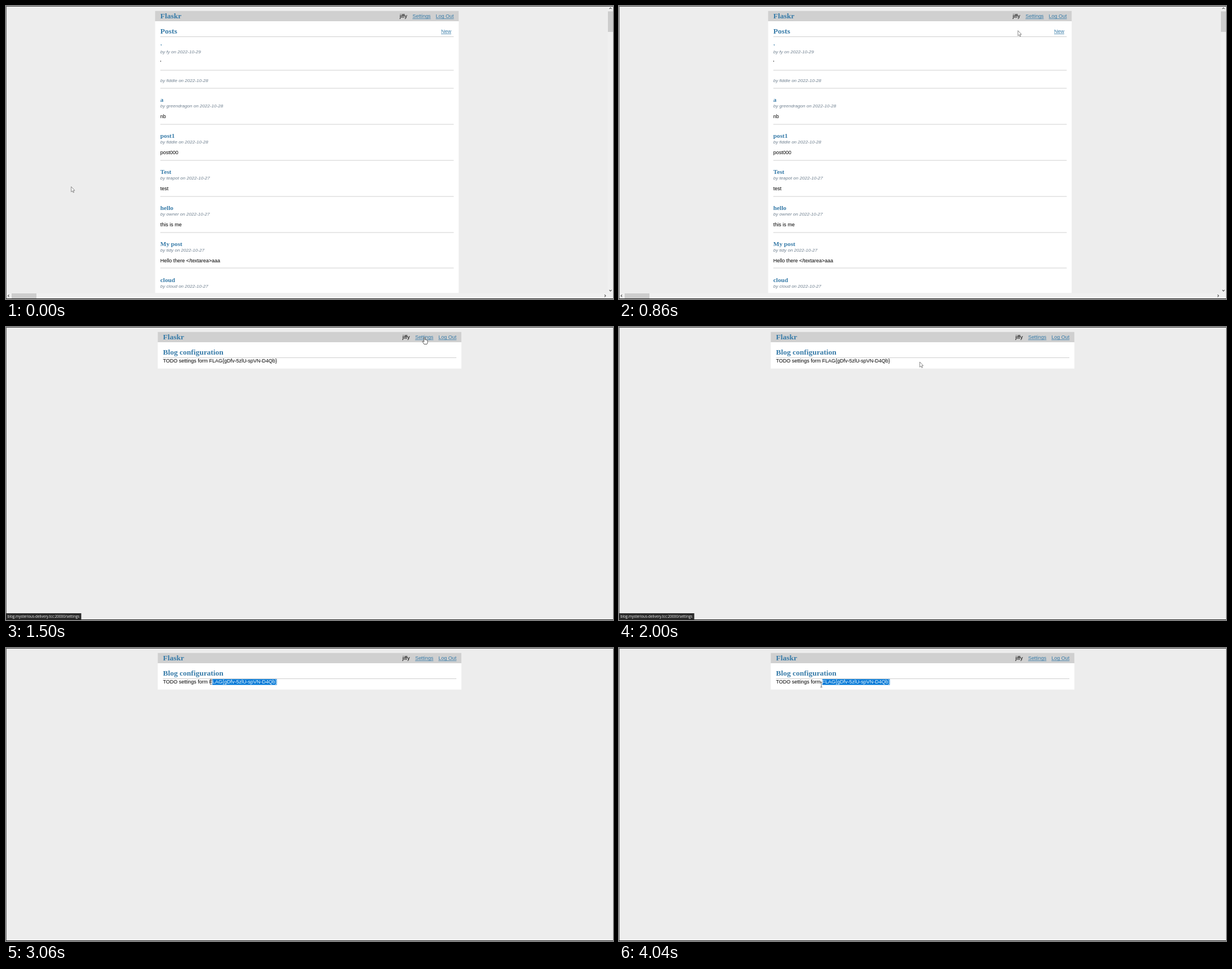
An HTML page with a canvas that plays this animation: 1077x520 px, repeating every 5420 ms.

```html
<!DOCTYPE html>
<html lang="en">
<head>
<meta charset="utf-8">
<title>Flaskr</title>
<style>
  html, body { margin: 0; width: 100%; height: 100%; overflow: hidden; background: #ededed; }
  canvas { display: block; }
</style>
</head>
<body>
<canvas id="stage" width="1077" height="520"></canvas>
<script>
const ctx = document.getElementById('stage').getContext('2d');
const W = 1077, H = 520, LOOP = 5420;
const PAGE_SWITCH = 1500, STATUS_ON = 1080, STATUS_OFF = 2100, SELECT_START = 2330, SELECT_LAG = 40;

const BLUE = '#377ba8', RULE = '#cfcfcf';
const SANS = '"Liberation Sans", Arial, sans-serif';
const SERIF = '"Liberation Serif", "Times New Roman", serif';
const BODY = '8.975px ' + SANS;
const ABOUT = 'italic 8.08px ' + SANS;
const HEADING = 'bold 13.46px ' + SERIF;
const TITLE = 'bold 11.22px ' + SERIF;
const STATUS = '6.36px "Open Sans", "Noto Sans", sans-serif';

const POSTS = [
  ["'", 'by fy on 2022-10-29', "'"],
  ['', 'by fiddle on 2022-10-28', ''],
  ['a', 'by greendragon on 2022-10-28', 'nb'],
  ['post1', 'by fiddle on 2022-10-28', 'post000'],
  ['Test', 'by teapot on 2022-10-27', 'test'],
  ['hello', 'by owner on 2022-10-27', 'this is me'],
  ['My post', 'by tidy on 2022-10-27', 'Hello there </textarea>aaa'],
  ['cloud', 'by cloud on 2022-10-27', '']
];
const SETTINGS_TEXT = 'TODO settings form FLAG{gDfv-5zlU-spVN-D4Qb}';
const FLAG_INDEX = SETTINGS_TEXT.indexOf('FLAG');

// Pointer path: time, x, y
const PATH = [
  [0, 115, 321], [500, 483, 174], [1000, 741, 21], [1160, 742.5, 18.5],
  [1780, 742.5, 18.5], [2000, 534, 62], [2260, 483, 60], [2340, 482, 60],
  [2720, 383, 60], [3060, 363.5, 60], [3500, 360, 62], [4040, 359, 65]
];

function slope(i, axis) {
  return (PATH[i + 1][axis] - PATH[i][axis]) / (PATH[i + 1][0] - PATH[i][0]);
}

// Monotone tangent, so that rests stay still and nothing overshoots
function tangent(i, axis) {
  if (i === 0) return slope(0, axis);
  if (i === PATH.length - 1) return 0;
  const a = slope(i - 1, axis), b = slope(i, axis);
  return a * b <= 0 ? 0 : 2 * a * b / (a + b);
}

function pointer(t) {
  const last = PATH.length - 1;
  if (t >= PATH[last][0]) return { x: PATH[last][1], y: PATH[last][2] };
  let i = 0;
  while (t >= PATH[i + 1][0]) i++;
  const span = PATH[i + 1][0] - PATH[i][0];
  const u = (t - PATH[i][0]) / span, v = 1 - u;
  const along = axis =>
    PATH[i][axis] * (1 + 2 * u) * v * v + PATH[i + 1][axis] * u * u * (3 - 2 * u) +
    span * u * v * (tangent(i, axis) * v - tangent(i + 1, axis) * u);
  return { x: along(1), y: along(2) };
}

function rect(x, y, w, h, color) {
  ctx.fillStyle = color;
  ctx.fillRect(x, y, w, h);
}

function text(str, x, y, font, color) {
  ctx.font = font;
  ctx.fillStyle = color;
  ctx.fillText(str, x, y);
}

function link(str, x, y) {
  text(str, x, y, BODY, BLUE);
  rect(x, y + 1.1, ctx.measureText(str).width, 0.8, BLUE);
}

function polyline(points, x, y, close) {
  ctx.beginPath();
  points.forEach(([px, py]) => ctx.lineTo(x + px, y + py));
  if (close) ctx.closePath();
}

function stroke(color, width) {
  ctx.strokeStyle = color;
  ctx.lineWidth = width;
  ctx.stroke();
}

function pageFrame(left, bottom, heading) {
  const inner = left + 9.2;
  rect(left, 8.8, 538.6, 18.2, '#d0d0d0');
  rect(left, 27, 538.6, bottom - 27, '#fff');
  text('Flaskr', inner, 22.4, HEADING, BLUE);
  text('jiffy', left + 433.9, 21.2, BODY, '#000');
  link('Settings', left + 456.6, 21.2);
  link('Log Out', left + 498, 21.2);
  text(heading, inner, 48.8, HEADING, BLUE);
  rect(inner, 54, 520.6, 1, RULE);
}

function scrollbars() {
  rect(1067.5, 1, 9.5, 518, '#f0f0f0');
  rect(1, 509.5, 1076, 9.5, '#f0f0f0');
  rect(1068, 9.5, 9, 36.5, '#cdcdcd');
  rect(10, 510, 44, 9, '#cdcdcd');
  const arrow = (x, y, dx, dy) => {
    polyline([[-dx - 2 * dy, -dy - 2 * dx], [dx, dy], [-dx + 2 * dy, -dy + 2 * dx]], x, y);
    stroke('#505050', 1.1);
  };
  arrow(1072.5, 4.2, 0, -1);
  arrow(1072.5, 505, 0, 1);
  arrow(4.5, 514.3, -1, 0);
  arrow(1063, 514.3, 1, 0);
}

function postsPage() {
  const left = 264.6, x = left + 9.2;
  pageFrame(left, 509.5, 'Posts');
  link('New', left + 507.4, 48);
  let y = 50.1;
  for (const [title, about, body] of POSTS) {
    text(title, x, y + 24.4, TITLE, BLUE);
    text(about, x, y + (title ? 34 : 21.2), ABOUT, 'slategray');
    text(body, x, y + 53, BODY, '#000');
    y += title ? 63.9 : 32;
    if (y < 509) rect(x, Math.round(y) - 0.5, 520.6, 1, RULE);
  }
  scrollbars();
}

function widthTo(index) {
  return ctx.measureText(SETTINGS_TEXT.slice(0, index)).width;
}

function settingsPage(t) {
  const left = 269.3, x = left + 9.2, y = 63.2;
  pageFrame(left, 73.8, 'Blog configuration');
  text(SETTINGS_TEXT, x, y, BODY, '#000');
  if (t < SELECT_START) return;

  const reach = pointer(t - SELECT_LAG).x;
  let first = SETTINGS_TEXT.length;
  while (first > FLAG_INDEX && x + (widthTo(first - 1) + widthTo(first)) / 2 > reach) first--;
  const from = x + widthTo(first), width = x + widthTo(SETTINGS_TEXT.length) - from;
  if (width <= 0) return;
  ctx.save();
  ctx.beginPath();
  ctx.rect(from, 55.2, width, 10.2);
  ctx.clip();
  rect(from, 55, width, 11, '#0078d7');
  text(SETTINGS_TEXT, x, y, BODY, '#fff');
  ctx.restore();
}

function statusBar() {
  rect(0, 508, 133.5, 11, '#2b2b2b');
  text('blog.mysterious-delivery.tcc:20000/settings', 2.5, 516.2, STATUS, '#f4f4f4');
}

function arrowCursor(x, y) {
  polyline([[0, 0], [0, 9.2], [2.1, 7.3], [3.5, 10.4], [4.9, 9.8], [3.6, 6.8], [6.2, 6.6]], x, y, true);
  ctx.fillStyle = '#fff';
  ctx.fill();
  stroke('#555', 0.7);
}

function handCursor(x, y) {
  polyline([[-0.9, 0.4], [0, -0.2], [0.9, 0.4], [0.9, 4], [2.5, 4.1], [4.2, 4.6], [5.5, 5.6],
    [5.5, 9], [4.4, 12], [-0.7, 12], [-3.6, 7.6], [-3.2, 6.5], [-2.2, 6.6], [-0.9, 8]], x, y, true);
  ctx.fillStyle = '#fff';
  ctx.fill();
  stroke('#333', 0.8);
}

function textCursor(x, y) {
  polyline([[-1.8, -4.4], [1.8, -4.4]], x, y);
  stroke('#444', 0.7);
  polyline([[-1.8, 4.4], [1.8, 4.4]], x, y);
  stroke('#444', 0.7);
  polyline([[0, -4.4], [0, 4.4]], x, y);
  stroke('#444', 0.8);
}

function drawCursor(t) {
  const { x, y } = pointer(t);
  const onLink = x > 721 && x < 758 && y > 12 && y < 24;
  if (onLink) handCursor(x, y);
  else if (t > PAGE_SWITCH && x < 484) textCursor(x, y);
  else arrowCursor(x, y);
}

function windowEdges() {
  rect(0, 0, W, 1, '#3a3a3a');
  rect(0, 0, 1, H, '#6a6a6a');
  rect(0, 519, W, 1, '#1c1c1c');
}

function draw(t) {
  rect(0, 0, W, H, '#ededed');
  if (t < PAGE_SWITCH) postsPage();
  else settingsPage(t);
  windowEdges();
  if (t >= STATUS_ON && t < STATUS_OFF) statusBar();
  drawCursor(t);
}

const start = performance.now();
function tick() {
  draw((performance.now() - start) % LOOP);
  requestAnimationFrame(tick);
}
tick();
</script>
</body>
</html>
```
